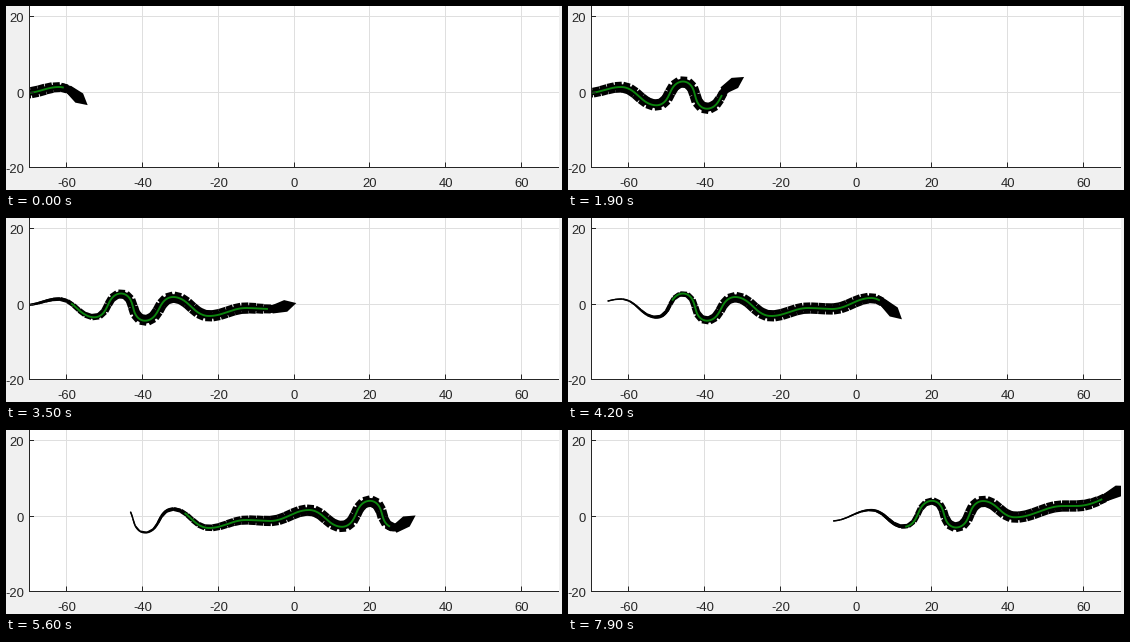
Animation of 556x184 px, one loop 8000 ms. Source, as a matplotlib script:

```python
import numpy as np
import matplotlib.pyplot as plt
from matplotlib.animation import FuncAnimation
from matplotlib.collections import PolyCollection
from matplotlib.patches import Polygon, Rectangle

W, H, DPI = 556, 184, 100
FRAMES, INTERVAL = 80, 100
LEFT, RIGHT, BASE = 23, 553, 161.5
X0, Y0, UNIT = 288, 86.5, 3.786
PX = 72 / DPI
INK, GRID = "#262626", "#dfdfdf"

# Crests and troughs of the track the snake slides along, in pixels
TURNS = [(0, 87), (20, 87), (53, 81), (88.5, 99.3), (115, 75.5), (139, 102.7),
         (167, 79), (203, 98), (240, 90), (264, 91), (303, 80), (336, 96.8),
         (364, 70.8), (388, 97.5), (415, 71), (447, 87.3), (495, 76),
         (508, 76), (575, 55)]


def smoothstep(t):
    t = np.clip(t, 0, 1)
    return t * t * (3 - 2 * t)


def meander(p, q, n=60):
    """Sine-generated curve that leaves p and reaches q level."""
    wave = np.sin(np.pi * (np.arange(n) + 0.5) / n)
    swings = np.linspace(0, 1.4, 80)
    turn = swings[:, None] * wave
    slopes = np.sin(turn).mean(axis=1) / np.cos(turn).mean(axis=1)
    dx, dy = q[0] - p[0], q[1] - p[1]
    heading = np.sign(dy) * np.interp(abs(dy) / dx, slopes, swings) * wave
    steps = np.column_stack([np.cos(heading), np.sin(heading)])
    return p + np.cumsum(steps, axis=0) * dx / steps[:, 0].sum()


curve = np.vstack([TURNS[:1]] + [meander(p, q) for p, q in zip(TURNS, TURNS[1:])])
arc = np.r_[0, np.cumsum(np.hypot(*np.diff(curve, axis=0).T))]


def point(s):
    return np.column_stack([np.interp(s, arc, axis) for axis in curve.T])


def unit(v):
    return v / np.hypot(v[:, 0], v[:, 1])[:, None]


def tangent(s, d=3.0):
    return unit(point(s + d) - point(s - d))


def normal(t):
    return np.column_stack([-t[:, 1], t[:, 0]])


# The snake advances by one link per step
START, LATER = np.interp([67.5, 458], curve[:, 0], arc)
LINK = (LATER - START) / 66
LINKS = 45
LENGTH = LINKS * LINK
HEAD = np.array([(-7, -4), (7.5, -6), (18.5, 0), (7.5, 6), (-7, 4)])


def width(d):
    """Body width at distance d from the tail tip."""
    return 1.3 + 10 * smoothstep(d / 210) - 3 * smoothstep((d - LENGTH + 35) / 35)


def scales(head):
    """One box per body link, square to its chord."""
    d = np.arange(LINKS - 1) * LINK
    s = head - LENGTH + d
    d, s = d[s > 3], s[s > 3]
    a, b = point(s), point(s + LINK)
    t = unit(b - a)
    n = normal(t) * width(d + LINK / 2)[:, None] / 2
    a, b = a + 0.25 * t, b - 0.25 * t
    return np.stack([a - n, b - n, b + n, a + n], axis=1)


def core(head):
    """Solid band under the scales, full width at tail and neck."""
    s = np.arange(max(head - LENGTH, 3), head, 1.5)
    d = s - head + LENGTH
    w = width(d)
    w = np.maximum(0.5 * w, np.minimum(w, 3.2))
    w = np.where(d > LENGTH - 14, 8, w)
    n = normal(tangent(s)) * w[:, None] / 2
    p = point(s)
    return np.vstack([p - n, (p + n)[::-1]])


def head_shape(head):
    s = np.array([head])
    t = tangent(s)
    return point(s) + HEAD[:, :1] * t + HEAD[:, 1:] * normal(t)


fig = plt.figure(figsize=(W / DPI, H / DPI), dpi=DPI, facecolor="#f0f0f0")
ax = fig.add_axes([0, 0, 1, 1])
ax.set(xlim=(0, W), ylim=(H, 0))
ax.axis("off")


def rule(xs, ys, color, z):
    ax.plot(xs, ys, color=color, lw=PX, zorder=z, solid_capstyle="butt", snap=False)


def label(x, y, text, ha):
    ax.text(x, y, text, ha=ha, va="center_baseline", color=INK,
            family="Liberation Sans", fontsize=13 * PX)


ax.add_patch(Rectangle((LEFT, -1), RIGHT - LEFT, BASE + 1, fc="white", lw=0,
                       zorder=0, snap=False))
for v in range(-60, 61, 20):
    x = np.floor(X0 + v * UNIT) + 0.5
    rule([x, x], [0, BASE], GRID, 1)
    rule([x, x], [BASE - 5, BASE], INK, 5)
    label(x, 176.5, str(v), "center")
for v in (20, 0, -20):
    y = min(np.floor(Y0 - v * UNIT) + 0.5, BASE)
    rule([LEFT, RIGHT], [y, y], GRID, 1)
    rule([LEFT, LEFT + 5], [y, y], INK, 5)
    label(18, y + 1, str(v), "right")
rule([LEFT + 0.5] * 2, [0, BASE + 0.5], INK, 5)
rule([LEFT, RIGHT], [BASE, BASE], INK, 5)

links = PolyCollection([], fc="black", lw=0, zorder=3)
ax.add_collection(links, autolim=False)
band, skull = (ax.add_patch(Polygon([(0, 0), (1, 0), (1, 1)], fc="black", lw=0, zorder=3))
               for _ in range(2))
spine, = ax.plot([], [], color="#0b840d", lw=1.9 * PX, zorder=4,
                 solid_capstyle="butt")
window = Rectangle((LEFT, 0), RIGHT - LEFT, BASE, transform=ax.transData)
for art in (links, band, skull, spine):
    art.set_clip_path(window)


def draw(i):
    step = i if i < 9 else i - 1  # one short pause early on
    head = START + step * LINK
    links.set_verts(scales(head))
    band.set_xy(core(head))
    skull.set_xy(head_shape(head))
    s = np.arange(max(head - LENGTH + 79, 3), head - 10, 1.5)
    spine.set_data(*point(s).T)
    return links, band, skull, spine


anim = FuncAnimation(fig, draw, frames=FRAMES, interval=INTERVAL,
                     repeat=True, repeat_delay=0, blit=False)
plt.show()
```
